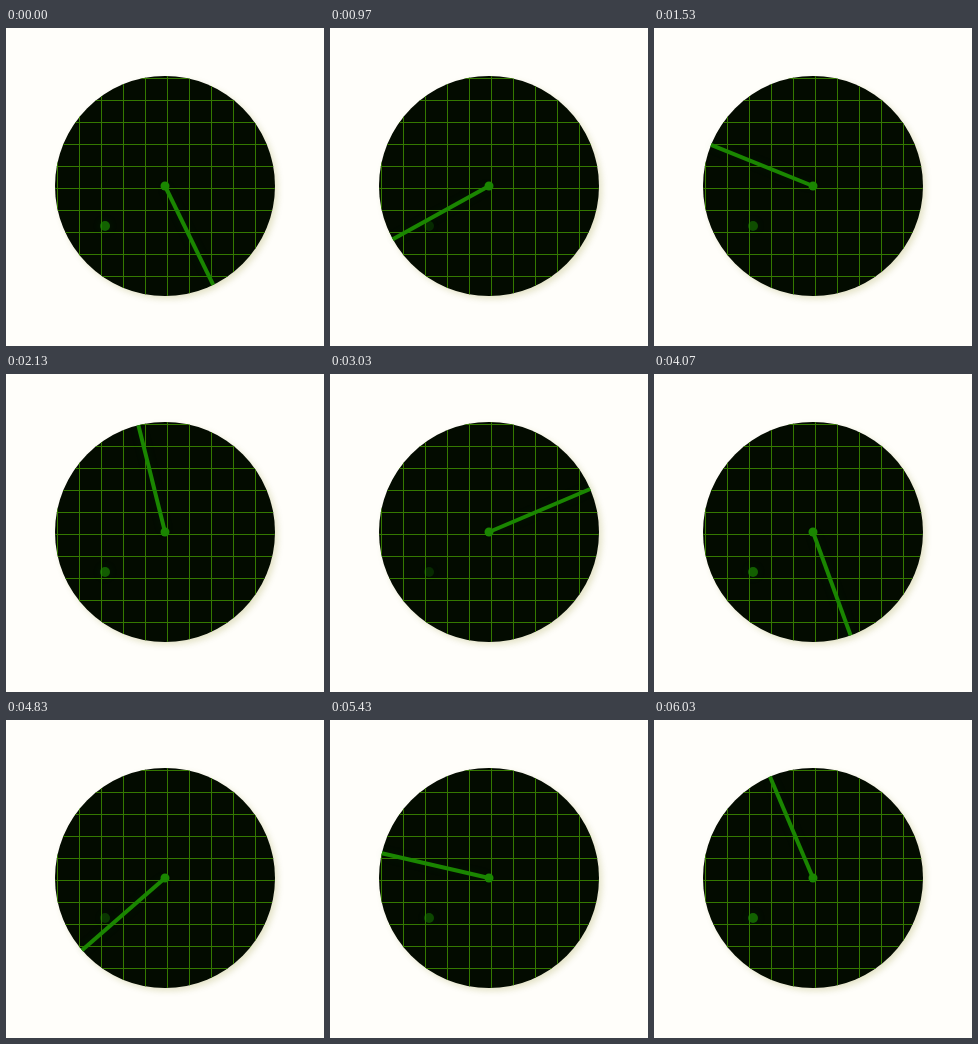
Animation of 318 by 318 pixels, one loop 6.06 s. Source, as an HTML page with a canvas:

```html
<!DOCTYPE html>
<html lang="en">
<head>
<meta charset="utf-8">
<title>Radar</title>
<style>
  html, body { margin: 0; width: 100%; height: 100%; overflow: hidden; background: #fffefa; }
  canvas { display: block; width: 318px; height: 318px; }
</style>
</head>
<body>
<canvas id="radar" width="318" height="318"></canvas>
<script>
const ctx = document.getElementById('radar').getContext('2d');
const SIZE = 318, CX = 159, CY = 158, R = 110;
const LOOP = 6060, TURN = 4000, PULSE = 2000, FRAME = 100 / 3;
const START = 154;
const GREEN = '#1a8600';

function disc(x, y, r, color) {
  ctx.fillStyle = color;
  ctx.beginPath();
  ctx.arc(x, y, r, 0, Math.PI * 2);
  ctx.fill();
}

function shadow(blur, color, offset = 0) {
  ctx.shadowBlur = blur;
  ctx.shadowColor = color;
  ctx.shadowOffsetX = ctx.shadowOffsetY = offset;
}

function drawScreen() {
  ctx.fillStyle = '#fffefa';
  ctx.fillRect(0, 0, SIZE, SIZE);
  ctx.save();
  shadow(6, 'rgba(120, 120, 0, 0.2)', 3);
  disc(CX, CY, R, '#030b00');
  ctx.restore();

  ctx.save();
  ctx.beginPath();
  ctx.arc(CX, CY, R, 0, Math.PI * 2);
  ctx.clip();
  ctx.fillStyle = '#347800';
  for (let d = 2; d < 2 * R; d += 22) {
    ctx.fillRect(CX - R + d, CY - R, 1, 2 * R);
    ctx.fillRect(CX - R, CY - R + d, 2 * R, 1);
  }
  ctx.restore();
}

function drawBlip(t) {
  const phase = (t % PULSE) / PULSE;
  const level = Math.abs(1 - 2 * phase) ** 0.7;
  ctx.save();
  ctx.globalAlpha = 0.2 + 0.5 * level;
  shadow(8, 'rgba(24, 132, 0, 0.2)');
  disc(99, 198, 5, GREEN);
  ctx.restore();
}

function drawSweep(t) {
  ctx.save();
  ctx.translate(CX, CY);
  ctx.rotate((START + 360 * t / TURN) * Math.PI / 180);
  shadow(8, 'rgba(24, 132, 0, 0.1)');
  ctx.fillStyle = GREEN;
  ctx.fillRect(-2, -R, 4, R);
  ctx.restore();
  disc(CX, CY, 4.5, GREEN);
}

function draw(now) {
  const ms = Math.floor((now % LOOP) / 10) * 10;
  const t = Math.floor((ms + 5) / FRAME) * FRAME;
  drawScreen();
  drawBlip(t);
  drawSweep(t);
}

let begin = null;
function tick(now) {
  if (begin === null) begin = now;
  draw(now - begin);
  requestAnimationFrame(tick);
}
draw(0);
requestAnimationFrame(tick);
</script>
</body>
</html>
```
